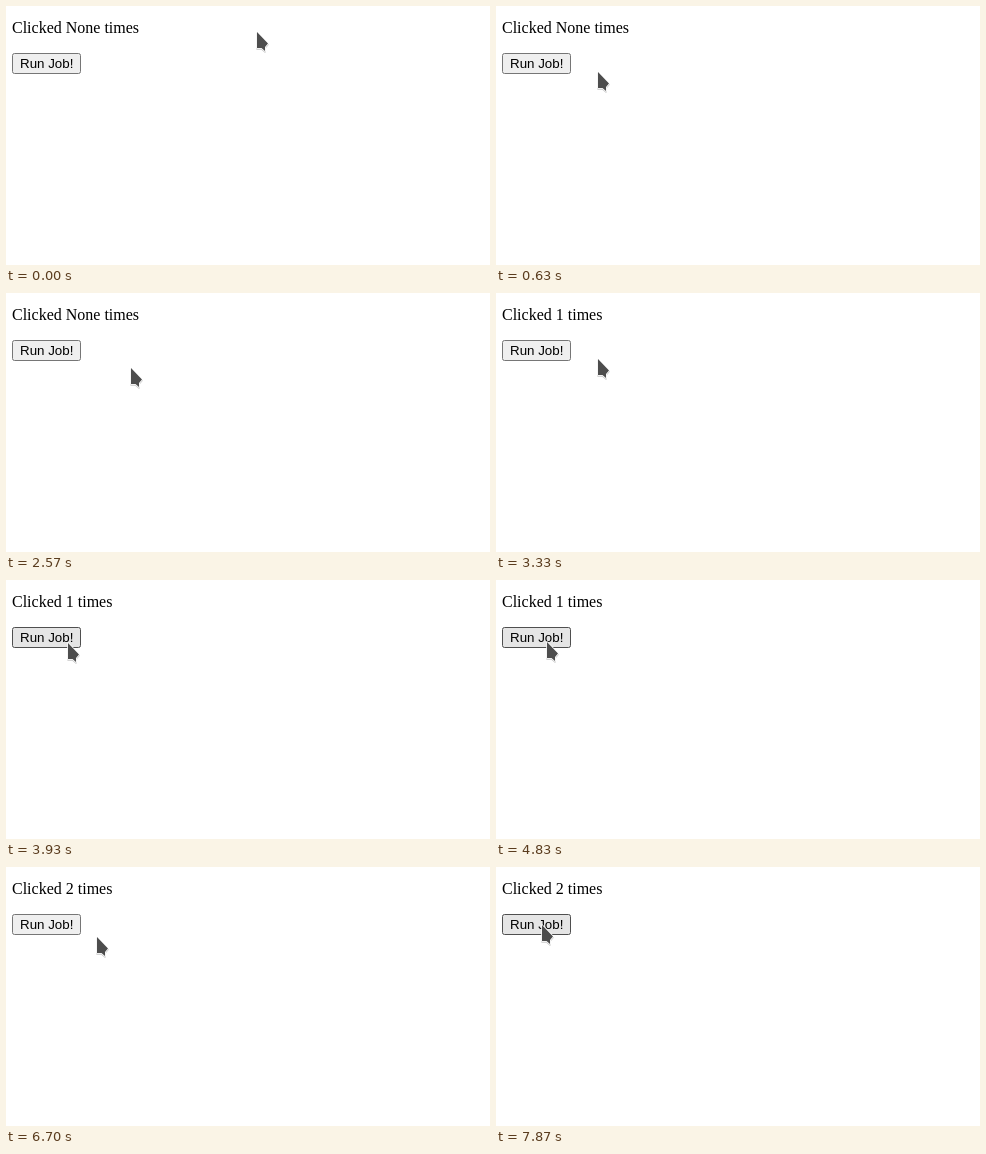
Recreate the animation shown at these times as an HTML page. Size 484 px wide and 259 px high, loop 8 s.

```html
<!DOCTYPE html>
<html lang="en">
<head>
<meta charset="utf-8">
<title>Run Job</title>
<style>
  html, body {
    margin: 0;
    width: 100%;
    height: 100%;
    overflow: hidden;
    background: #fff;
    color: #000;
  }
  p, .button, .cursor {
    position: absolute;
    /* the small lead keeps rounded key times on the right side of each step */
    animation: 8s step-end -5ms infinite;
  }
  p {
    left: 6px;
    top: 13px;
    margin: 0;
    font: 16px "Liberation Serif", "Times New Roman", serif;
    white-space: nowrap;
    visibility: hidden;
  }
  .none { animation-name: none-yet; }
  .one { animation-name: once; }
  .two { animation-name: twice; }
  @keyframes none-yet {
    0% { visibility: visible; }
    41.667%, 100% { visibility: hidden; }
  }
  @keyframes once {
    0% { visibility: hidden; }
    41.667% { visibility: visible; }
    83.75%, 100% { visibility: hidden; }
  }
  @keyframes twice {
    0% { visibility: hidden; }
    83.75%, 100% { visibility: visible; }
  }

  .button {
    left: 6px;
    top: 47px;
    box-sizing: border-box;
    width: 69px;
    height: 21px;
    padding: 2px 0 0 7px;
    border: 1px solid #767676;
    border-radius: 2.5px;
    background: #efefef;
    font: 13.3333px "Liberation Sans", Arial, sans-serif;
    white-space: nowrap;
    animation-name: press;
  }
  @keyframes press {
    /* idle */
    0%, 20%, 61.667% { background: #efefef; border-color: #767676; }
    /* hover */
    10.833%, 15.833%, 47.917%, 57.5%, 90.417%, 98.333%, 100% {
      background: #e5e5e5; border-color: #4f4f4f;
    }
    /* held down */
    14.167%, 55.833%, 96.25% { background: #f5f5f5; border-color: #8d8d8d; }
  }

  .cursor {
    width: 12px;
    height: 20px;
    overflow: visible;
    fill: #4d4d4d;
    stroke: #fff;
    stroke-width: 1.6;
    stroke-linejoin: round;
    paint-order: stroke;
    filter: drop-shadow(.5px 1px .6px rgba(0, 0, 0, .22));
    animation-name: roam;
  }
  /* each move advances at 30 steps a second */
  @keyframes roam {
    0% { left: 251px; top: 26px; }
    2.5% { left: 251px; top: 26px; animation-timing-function: steps(4); }
    4.167% { left: 228px; top: 36px; animation-timing-function: steps(4); }
    5.833% { left: 170px; top: 55px; animation-timing-function: steps(5); }
    7.917% { left: 102px; top: 66px; animation-timing-function: steps(4); }
    9.583% { left: 78px; top: 71px; animation-timing-function: steps(6); }
    12.083% { left: 50px; top: 62px; }

    19.167% { left: 50px; top: 62px; }
    19.583% { left: 60px; top: 64px; animation-timing-function: steps(2); }
    20.417% { left: 130px; top: 75px; animation-timing-function: steps(2); }
    21.25% { left: 164px; top: 71px; }

    28.75% { left: 164px; top: 71px; animation-timing-function: steps(5); }
    30.833% { left: 138px; top: 75px; animation-timing-function: steps(6); }
    33.333% { left: 112px; top: 74px; }

    35.417% { left: 112px; top: 74px; animation-timing-function: steps(3); }
    36.667% { left: 102px; top: 70px; }
    40% { left: 102px; top: 66px; }

    45.417% { left: 102px; top: 66px; animation-timing-function: steps(6); }
    47.917% { left: 74px; top: 65px; animation-timing-function: steps(6); }
    50.417% { left: 50px; top: 61px; }

    60% { left: 50px; top: 61px; }
    60.417% { left: 51px; top: 62px; animation-timing-function: steps(5); }
    62.5% { left: 78px; top: 72px; animation-timing-function: steps(4); }
    64.167% { left: 91px; top: 70px; }

    88.333% { left: 91px; top: 70px; animation-timing-function: steps(5); }
    90.417% { left: 72px; top: 66px; animation-timing-function: steps(6); }
    92.917%, 100% { left: 46px; top: 58px; }
  }
</style>
</head>
<body>
  <p class="none">Clicked None times</p>
  <p class="one">Clicked 1 times</p>
  <p class="two">Clicked 2 times</p>
  <div class="button">Run Job!</div>
  <svg class="cursor" viewBox="0 0 12 20" aria-hidden="true">
    <path d="M0 0L11 11.5L8 15V19L4.5 16H0Z"/>
  </svg>
</body>
</html>
```
